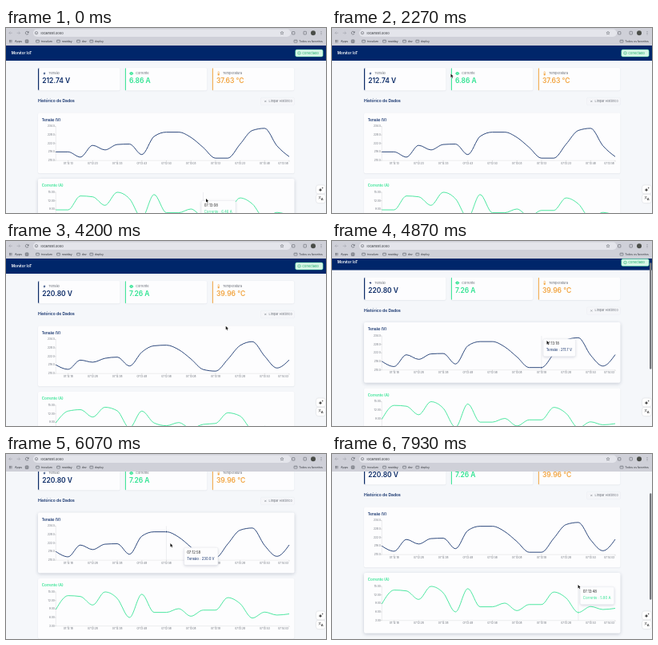
These frames come from a looping animation (400 by 232 pixels, 8000 ms). An HTML page with a canvas:

```html
<!DOCTYPE html>
<html lang="pt-BR">
<head>
<meta charset="utf-8">
<title>Monitor IoT</title>
<style>
html, body { margin: 0; width: 100%; height: 100%; overflow: hidden; background: #f5f7fa; }
canvas { display: block; width: 400px; height: 232px; }
</style>
</head>
<body>
<canvas id="stage"></canvas>
<script>
const W = 400, H = 232, LOOP = 8000;
const NAVY = '#0a2a66', GREEN = '#2fe391', ORANGE = '#f2a541', GRAY = '#666b75';
const canvas = document.getElementById('stage');
const ctx = canvas.getContext('2d');
const ratio = Math.max(1, window.devicePixelRatio || 1);
canvas.width = W * ratio;
canvas.height = H * ratio;

const volts = [216.1, 216.1, 212.4, 220.7, 217.5, 221.3, 221.6, 214.2, 227, 230, 230,
  226.3, 219.2, 211.7, 211.7, 221.5, 231.2, 232.7, 220.4, 212.74, 220.8];
const amps = [8.8, 8.8, 13.7, 13.4, 10.4, 15, 12.7, 6, 14.2, 7.8, 7.8,
  9.1, 6.46, 8.6, 8.6, 13, 10.9, 5.8, 7.9, 6.86, 7.26];
const UPDATE = 3500, MORPH = 1500, POINTS = 20;
const LEFT = 62.3, RIGHT = 354, STEP = (RIGHT - LEFT) / (POINTS - 1), PLOT_H = 42.7;

const charts = [
  { name: 'Tensão', unit: 'V', data: volts, min: 210, max: 234, digits: 1, top: 106.5, color: NAVY },
  { name: 'Corrente', unit: 'A', data: amps, min: 3, max: 15, digits: 2, top: 189, color: GREEN }
];
const cards = [
  { name: 'Tensão', values: ['212.74 V', '220.80 V'], x: 40, color: NAVY, icon: bolt },
  { name: 'Corrente', values: ['6.86 A', '7.26 A'], x: 148.7, color: GREEN, icon: plug },
  { name: 'Temperatura', values: ['37.63 °C', '39.96 °C'], x: 257.7, color: ORANGE, icon: thermometer }
];
const CARD_W = 102.5, CARD_Y = 50, CARD_H = 28.5;

// Pointer tip: time, x, y
const path = [
  [-400, 226, 213], [-60, 250, 214], [350, 250, 214], [900, 196, 150], [1500, 145, 90], [1900, 144.5, 66],
  [2270, 148.5, 57.5], [2800, 190, 63], [3100, 215, 63], [3400, 267, 61], [3750, 290, 63],
  [4450, 268.5, 124.6], [4870, 268.5, 125], [5200, 268.5, 124], [5500, 268.5, 124],
  [6100, 205, 112], [6560, 214, 114], [6930, 279, 117], [7150, 285, 122], [7930, 307.5, 164], [8000, 308, 164]
];
const scrollPath = [[0, 0], [4772, 0], [5200, 33], [7300, 33], [7650, 40], [8000, 40]];

const clamp = (v, a, b) => Math.min(b, Math.max(a, v));
const smooth = u => u * u * (3 - 2 * u);

function along(keys, t) {
  let i = 1;
  while (i < keys.length - 1 && keys[i][0] < t) i++;
  const a = keys[i - 1], b = keys[i];
  const u = smooth(clamp((t - a[0]) / (b[0] - a[0]), 0, 1));
  return a.slice(1).map((v, j) => v + (b[j + 1] - v) * u);
}
const scrollAt = t => along(scrollPath, t)[0];

// The page only notices the pointer once scrolling has settled.
function pointerOnPage(t) {
  const [x, y] = along(path, t);
  return { x, y: y + (t < 5300 ? 0 : scrollAt(t)) };
}
const inside = (p, x, y, w, h) => p.x >= x && p.x <= x + w && p.y >= y && p.y <= y + h;

function recent(t, span, fn) {
  const n = 20;
  let sum = 0, count = 0;
  for (let i = 0; i < n; i++) {
    const v = fn(pointerOnPage(t - span * i / n));
    if (v !== null) { sum += v; count++; }
  }
  return count ? sum / count : 0;
}
const hoverOf = (t, x, y, w, h) => recent(t, 250, p => inside(p, x, y, w, h) ? 1 : 0);

function box(x, y, w, h, r, fill, stroke, width = 0.3) {
  ctx.beginPath();
  ctx.roundRect(x, y, w, h, r);
  if (fill) { ctx.fillStyle = fill; ctx.fill(); }
  if (stroke) { ctx.strokeStyle = stroke; ctx.lineWidth = width; ctx.stroke(); }
}
function panel(x, y, w, h, lift) {
  ctx.save();
  ctx.shadowColor = `rgba(20,35,70,${0.1 + 0.1 * lift})`;
  ctx.shadowBlur = (1.5 + 2.5 * lift) * ratio;
  ctx.shadowOffsetY = (0.4 + 0.8 * lift) * ratio;
  box(x, y, w, h, 2, '#fdfdfe');
  ctx.restore();
}
function text(s, x, y, size, color, weight = 400, align = 'left') {
  ctx.font = `${weight} ${size}px Inter, sans-serif`;
  ctx.textAlign = align;
  ctx.textBaseline = 'middle';
  ctx.fillStyle = color;
  ctx.fillText(s, x, y - 0.3);
}
function poly(points, fill, stroke, width = 0.6) {
  ctx.beginPath();
  points.forEach(([x, y], i) => i ? ctx.lineTo(x, y) : ctx.moveTo(x, y));
  if (fill) { ctx.closePath(); ctx.fillStyle = fill; ctx.fill(); }
  if (stroke) { ctx.strokeStyle = stroke; ctx.lineWidth = width; ctx.stroke(); }
}
function disc(x, y, r, fill, stroke, width = 0.5) {
  ctx.beginPath();
  ctx.arc(x, y, r, 0, 7);
  if (fill) { ctx.fillStyle = fill; ctx.fill(); }
  if (stroke) { ctx.strokeStyle = stroke; ctx.lineWidth = width; ctx.stroke(); }
}
const line = (x1, y1, x2, y2, color, width) => poly([[x1, y1], [x2, y2]], null, color, width);

function bolt(x, y, c) {
  poly([[x + 0.5, y - 2.2], [x - 1.5, y + 0.4], [x, y + 0.4], [x - 0.5, y + 2.2], [x + 1.5, y - 0.5], [x, y - 0.5]], c);
}
function plug(x, y, c) {
  disc(x, y, 2, c);
  line(x - 2.6, y, x + 2.6, y, c, 0.8);
  poly([[x + 0.3, y - 1.2], [x - 0.8, y + 0.2], [x + 0.7, y], [x - 0.2, y + 1.2]], null, '#fff', 0.35);
}
function thermometer(x, y, c) {
  box(x - 0.7, y - 2.4, 1.4, 3.6, 0.7, null, c, 0.5);
  disc(x, y + 1.4, 1.1, c);
}
function folder(x, y) {
  box(x - 2, y - 1.5, 4, 3.1, 0.5, null, '#555a63', 0.5);
  line(x - 1.8, y - 0.8, x + 1.8, y - 0.8, '#555a63', 0.4);
}

function clock(i) {
  const s = 12 * 60 + 8 + 5 * i + (i > 16 ? 15 : 0);
  const two = n => String(n).padStart(2, '0');
  return `07:${two(Math.floor(s / 60))}:${two(s % 60)}`;
}

// Monotone cubic through evenly spaced points
function curve(ys, color) {
  const n = ys.length;
  const d = ys.slice(1).map((y, i) => (y - ys[i]) / STEP);
  const m = ys.map((_, i) => {
    if (i === 0 || i === n - 1) return null;
    const a = d[i - 1], b = d[i];
    return (Math.sign(a) + Math.sign(b)) * Math.min(Math.abs(a), Math.abs(b), Math.abs(a + b) / 4);
  });
  m[0] = (3 * d[0] - m[1]) / 2;
  m[n - 1] = (3 * d[n - 2] - m[n - 2]) / 2;
  ctx.beginPath();
  ctx.moveTo(LEFT, ys[0]);
  for (let i = 1; i < n; i++) {
    const x = LEFT + i * STEP, k = STEP / 3;
    ctx.bezierCurveTo(x - 2 * k, ys[i - 1] + m[i - 1] * k, x - k, ys[i] - m[i] * k, x, ys[i]);
  }
  ctx.strokeStyle = color;
  ctx.lineWidth = 0.85;
  ctx.stroke();
}

function drawChart(c, t) {
  const plotTop = c.top + 17, bottom = plotTop + PLOT_H;
  const shift = t < UPDATE ? 0 : 1;
  const mix = 1 - Math.pow(1 - clamp((t - UPDATE) / MORPH, 0, 1), 3);
  const yOf = v => bottom - (v - c.min) / (c.max - c.min) * PLOT_H;
  panel(40, c.top, 320.5, 75.8, hoverOf(t, 40, c.top, 320.5, 75.8));
  text(`${c.name} (${c.unit})`, 44.7, c.top + 9, 4.5, c.color, 600);

  line(LEFT, plotTop, LEFT, bottom, '#b4b8bf', 0.25);
  line(LEFT, bottom, RIGHT, bottom, '#b4b8bf', 0.25);
  for (let i = 0; i <= 4; i++) {
    const y = bottom - PLOT_H * i / 4;
    line(LEFT - 1.4, y, LEFT, y, '#888', 0.3);
    text((c.min + (c.max - c.min) * i / 4).toFixed(c.digits), LEFT - 1.6, y + 0.3, 3.2, GRAY, 400, 'right');
  }
  for (let k = 1; k < POINTS; k += 2) {
    const x = LEFT + k * STEP;
    line(x, bottom, x, bottom + 1.4, '#888', 0.3);
    text(clock(k + shift), Math.min(x, 346.5), bottom + 3.9, 3.2, GRAY, 400, 'center');
  }

  const p = pointerOnPage(t);
  const over = q => inside(q, LEFT, plotTop - 2, RIGHT - LEFT, PLOT_H + 2);
  const indexOf = q => Math.round((q.x - LEFT) / STEP);
  const active = over(p) ? indexOf(p) : -1;
  if (active >= 0) {
    const x = LEFT + active * STEP;
    line(x, plotTop, x, bottom, '#c9ccd2', 0.3);
  }
  const ys = Array.from({ length: POINTS }, (_, k) => yOf(c.data[k] + (c.data[k + 1] - c.data[k]) * mix));
  curve(ys, c.color);
  if (active < 0) return;

  disc(LEFT + active * STEP, ys[active], 1, c.color, '#fff', 0.4);
  const i = active + shift, size = 4.3, height = 22;
  const label = `${c.name} : ${c.data[i].toFixed(c.digits)} ${c.unit}`;
  const x = recent(t, 320, q => over(q) ? LEFT + indexOf(q) * STEP + 2.2 : null);
  const y = recent(t, 320, q => over(q) ? Math.min(q.y + 2.8, plotTop + PLOT_H - height + 11.5) : null)
    - (c.unit === 'V' ? 0.4 : 0);
  ctx.font = `400 ${size}px Inter, sans-serif`;
  const w = ctx.measureText(label).width + 8;
  return () => {
    panel(x, y, w, height, 0.8);
    box(x, y, w, height, 1.5, null, '#dde0e6', 0.3);
    text(clock(i), x + 3.6, y + 6.6, size, '#222');
    text(label, x + 3.6, y + 14.5, size, c.color);
  };
}

function drawCard(c, t) {
  const lift = hoverOf(t, c.x, CARD_Y, CARD_W, CARD_H);
  const y = CARD_Y - 1.1 * lift;
  panel(c.x, y, CARD_W, CARD_H, lift);
  ctx.save();
  ctx.beginPath();
  ctx.roundRect(c.x, y, CARD_W, CARD_H, 2);
  ctx.clip();
  ctx.fillStyle = c.color;
  ctx.fillRect(c.x, y, 1.2, CARD_H);
  ctx.restore();
  c.icon(c.x + 8, y + 7, c.color);
  text(c.name, c.x + 13.3, y + 7.1, 4, GRAY);
  text(c.values[t < UPDATE ? 0 : 1], c.x + 5.2, y + 17.2, 8.5, c.color, 600);
}

function drawPage(t, scroll) {
  ctx.save();
  ctx.beginPath();
  ctx.rect(0, 22, W, H - 22);
  ctx.clip();
  ctx.fillStyle = '#f5f7fa';
  ctx.fillRect(0, 22, W, H);
  ctx.translate(0, -scroll);
  ctx.fillStyle = '#00266a';
  ctx.fillRect(0, 22, W, 19);
  text('Monitor IoT', 6.8, 31.8, 4.7, '#fff', 600);
  box(361.7, 27, 34.5, 9, 1.8, '#d8f7e7', GREEN, 0.4);
  disc(366.5, 31.5, 1.8, null, '#16a866', 0.5);
  poly([[365.7, 31.5], [366.3, 32.1], [367.4, 30.9]], null, '#16a866', 0.4);
  text('Conectado', 370.2, 31.7, 4, '#16a866');

  cards.forEach(c => drawCard(c, t));
  text('Histórico de Dados', 40, 92.2, 5, NAVY, 600);
  box(318.5, 87.2, 42, 9.6, 1.5, '#f5f6f9', '#e4e7ec', 0.3);
  line(323.2, 90.8, 325.4, 93, GRAY, 0.45);
  line(325.4, 90.8, 323.2, 93, GRAY, 0.45);
  text('Limpar Histórico', 328.6, 92.1, 3.75, GRAY);
  charts.map(c => drawChart(c, t)).forEach(tip => tip && tip());
  ctx.restore();
}

function drawChrome() {
  const ink = '#4b4f57', faint = '#9b9da6';
  ctx.fillStyle = '#cfd0d8';
  ctx.fillRect(0, 0, W, 22);
  box(34, 1.5, 322, 9.4, 4.7, '#e4e5eb');
  for (const [x, s] of [[5.8, 1], [15.5, -1]]) {
    line(x - 2, 6.2, x + 2, 6.2, faint, 0.55);
    poly([[x - 0.3 * s, 4.5], [x - 2 * s, 6.2], [x - 0.3 * s, 7.9]], null, faint, 0.55);
  }
  ctx.beginPath();
  ctx.arc(26.2, 6.2, 1.9, 0.3, 5.5);
  ctx.strokeStyle = ink;
  ctx.lineWidth = 0.55;
  ctx.stroke();
  poly([[28.4, 3.9], [28.4, 5.9], [26.5, 5.9]], ink);
  disc(38, 6.2, 1.7, null, ink);
  line(38, 6, 38, 7.2, ink, 0.4);
  text('localhost:3000', 43.6, 6.6, 4, '#25282d');

  const star = Array.from({ length: 11 }, (_, i) => {
    const a = i * Math.PI / 5 - Math.PI / 2, r = i % 2 ? 1 : 2.2;
    return [345 + r * Math.cos(a), 6.3 + r * Math.sin(a)];
  });
  poly(star, null, ink, 0.4);
  box(357.5, 4.6, 3.4, 3.4, 0.5, null, ink, 0.5);
  box(372, 4.3, 3.4, 3.8, 0.5, null, ink, 0.5);
  disc(384, 6.2, 3, '#4a4d48');
  for (const y of [4.5, 6.2, 7.9]) disc(394, y, 0.45, ink);

  for (let i = 0; i < 9; i++) {
    ctx.fillStyle = ink;
    ctx.fillRect(4 + i % 3 * 1.3, 14.9 + Math.floor(i / 3) * 1.3, 0.8, 0.8);
  }
  text('Apps', 11, 16.9, 3.6, '#33363c');
  box(24.3, 14.9, 3.6, 3.6, 0.4, null, ink, 0.6);
  line(26.1, 14.9, 26.1, 18.5, ink, 0.5);
  line(24.3, 16.7, 27.9, 16.7, ink, 0.5);
  for (const [x, name] of [[39.5, 'trovalum'], [65.5, 'neatday'], [90.5, 'dev'], [106.8, 'deploy'], [362, 'Todos os favoritos']]) {
    folder(x, 16.6);
    text(name, x + 4.3, 16.9, 3.4, '#33363c');
  }
}

function drawSide(t, scroll) {
  for (const y of [202.5, 214]) {
    ctx.save();
    ctx.shadowColor = 'rgba(0,0,0,.18)';
    ctx.shadowBlur = 2 * ratio;
    box(388, y - 5.2, 11, 10.4, 3, '#fff');
    ctx.restore();
  }
  const spark = (x, y, r) => poly([[x, y - r], [x + r / 4, y - r / 4], [x + r, y], [x + r / 4, y + r / 4],
    [x, y + r], [x - r / 4, y + r / 4], [x - r, y], [x - r / 4, y - r / 4]], '#222');
  spark(393, 203, 2.5);
  spark(395.7, 200.6, 1.1);
  ctx.font = '500 3.8px "Noto Sans CJK SC", sans-serif';
  ctx.textAlign = 'center';
  ctx.fillText('文', 392.2, 213);
  text('A', 395.3, 215.2, 4, '#222', 600, 'center');

  const shown = Math.max(
    clamp((t - 4760) / 60, 0, 1) * clamp((6050 - t) / 250, 0, 1),
    clamp((t - 7280) / 60, 0, 1));
  if (shown > 0) {
    ctx.globalAlpha = shown;
    box(397, 24.5 + scroll * 0.62, 2.4, 133.5, 1.2, '#74767c');
    ctx.globalAlpha = 1;
  }
}

function drawPointer(t) {
  const [x, y] = along(path, t);
  const shape = [[0, 0], [0, 4.4], [1, 3.5], [1.8, 5.2], [2.5, 4.9], [1.8, 3.2], [3.1, 3.1], [0, 0]]
    .map(([a, b]) => [x + a, y + b]);
  poly(shape, null, '#fff', 0.9);
  poly(shape, '#111');
}

function frame(now) {
  const t = now % LOOP, scroll = scrollAt(t);
  ctx.setTransform(ratio, 0, 0, ratio, 0, 0);
  ctx.lineJoin = 'round';
  drawPage(t, scroll);
  drawChrome();
  drawSide(t, scroll);
  drawPointer(t);
  requestAnimationFrame(frame);
}
requestAnimationFrame(frame);
</script>
</body>
</html>
```
